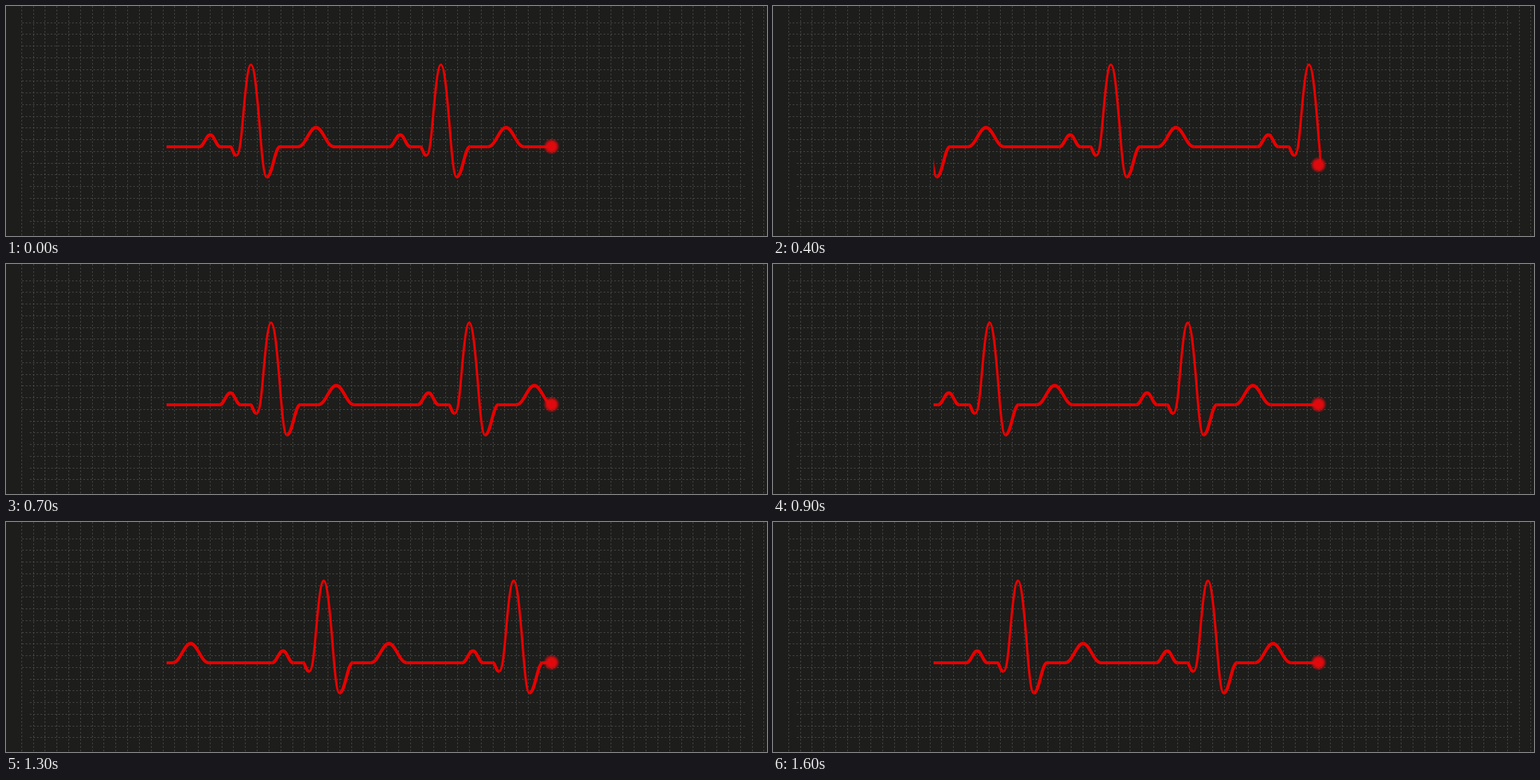
These frames come from a looping animation (1280 by 388 pixels, 1700 ms). An HTML page:

```html
<!DOCTYPE html>
<html lang="en">
<head>
<meta charset="utf-8">
<title>Heartbeat</title>
<style>
  html, body { margin: 0; width: 100%; height: 100%; overflow: hidden; background: #1d1d1b; }
  svg { display: block; width: 100%; height: 100%; }
</style>
</head>
<body>
<svg viewBox="0 0 1280 388">
  <defs>
    <clipPath id="window"><rect x="270" y="80" width="651.8" height="230"/></clipPath>
    <radialGradient id="glow">
      <stop offset="0" stop-color="#e4060a"/>
      <stop offset=".4" stop-color="#e00a0e"/>
      <stop offset=".62" stop-color="#e00a0e" stop-opacity=".85"/>
      <stop offset=".8" stop-color="#e00a0e" stop-opacity=".42"/>
      <stop offset="1" stop-color="#e00a0e" stop-opacity="0"/>
    </radialGradient>
    <!-- One beat, with x = 0 at the tall peak -->
    <g id="beat">
      <path stroke-width="4.8" d="M-170 237.5H165"  stroke-dasharray="83 36 16 84 30 61 25"/>
      <path stroke-width="5.3" d="M-87 237.5C-79 237.5 -76 217.5 -68.5 217.5S-59 237.5 -51 237.5M-35 237.5C-31 237.5 -30 252 -24.5 252"/>
      <path stroke-width="4" d="M-24.5 252C-18.5 252 -16 218 -13.5 190C-11 162 -6 99 0 99C6 99 10 150 13 183C16 216 20 288.5 26.5 288.5"/>
      <path stroke-width="5.3" d="M26.5 288.5C36 288.5 40 237.5 49 237.5M79 237.5C92 237.5 98 205 109.5 205S127 237.5 140 237.5"/>
    </g>
  </defs>
  <path id="grid" fill="none" stroke="#4c4c4a" stroke-dasharray="3 3" shape-rendering="crispEdges"/>
  <g clip-path="url(#window)">
    <g id="trace" fill="none" stroke="#e60000" stroke-linejoin="round"></g>
  </g>
  <circle id="dot" cx="917.5" r="14" fill="url(#glow)"/>
</svg>
<script>
  const STEP_MS = 100, STEPS = 17, STEP_PX = 40.8, PERIOD_PX = STEP_PX * 16;
  const dotY = [237, 237, 221, 252, 268, 237, 215, 237, 237,
                237, 228, 237, 287, 237, 207, 237, 237];
  const byId = id => document.getElementById(id);
  const trace = byId('trace'), dot = byId('dot');

  function buildGrid() {
    const snap = v => Math.floor(v) + .5;
    let d = '';
    for (let i = 0; i < 64; i++) d += `M${snap(26.2 + i * 19.82)} 0V388`;
    for (let i = 0; i < 18; i++) {
      const y = snap(28.2 + i * 19.74);
      d += `M${y < 250 ? 27 : 40} ${y}H1243`;
    }
    byId('grid').setAttribute('d', d);
  }

  function buildTrace() {
    let beats = '';
    for (let k = 0; k < 3; k++)
      for (const x of [412, 731.5])
        beats += `<use href="#beat" x="${x + k * PERIOD_PX}"/>`;
    trace.innerHTML = beats;
  }

  function draw(ms) {
    const step = Math.floor(ms / STEP_MS) % STEPS;
    trace.setAttribute('transform', `translate(${-step * STEP_PX} 0)`);
    dot.setAttribute('cy', dotY[step]);
  }

  buildGrid();
  buildTrace();
  draw(0);
  const start = performance.now();
  function tick() {
    draw(performance.now() - start);
    requestAnimationFrame(tick);
  }
  requestAnimationFrame(tick);
</script>
</body>
</html>
```
